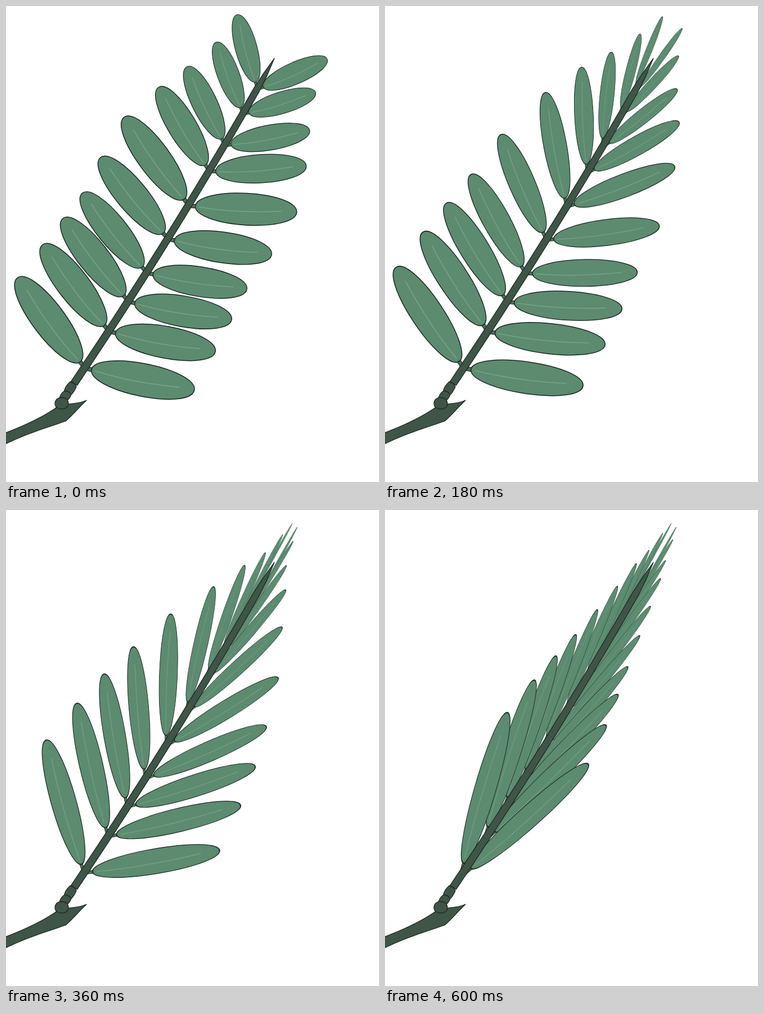
An HTML page that plays this animation: 663 px wide and 845 px high, repeating every 660 ms.

```html
<!DOCTYPE html>
<html lang="en">
<head>
<meta charset="utf-8">
<title>Folding leaf</title>
<style>
  html, body { margin: 0; width: 100%; height: 100%; overflow: hidden; background: #fff; }
  svg { display: block; width: 663px; height: 845px; }
  .wood { fill: #3f5547; stroke: #1c2a22; stroke-width: 1.3; stroke-linejoin: round; }
  .blade { fill: #5c8b70; stroke: #1b2720; stroke-width: 1.6; }
  .neck { fill: #4c705c; stroke: #1b2720; stroke-width: 1.2; }
  .vein { fill: none; stroke: #76a086; stroke-width: 1.9; stroke-linecap: round; }
</style>
</head>
<body>
<svg viewBox="0 0 663 845">
  <defs>
    <g id="leaf">
      <path class="neck" d="M-2-3 L13-4 V4 L-2 3Z"/>
      <path class="blade" d="M8 0C8-17 51-30 105-30C158-30 200-18 200 0C200 18 158 30 105 30C51 30 8 17 8 0Z"/>
      <path class="vein" d="M15 1Q88 9 171 0"/>
    </g>
  </defs>
  <g id="leaves"></g>
  <path class="wood" id="stem"/>
  <g class="wood">
    <path d="M-4 759C30 746 66 730 92 711C104 704 122 709 143 700C130 712 119 726 106 737C70 749 34 760 -4 779Z"/>
    <path d="M104 685Q103 677 114 667Q123 669 125 676Q121 685 117 689Q110 690 104 685Z"/>
    <path d="M95 697Q96 689 104 683Q113 684 116 690Q113 697 109 700Q101 701 95 697Z"/>
    <path d="M90 698Q99 692 108 698Q114 706 108 713Q99 718 90 713Q84 706 90 698Z"/>
  </g>
</svg>
<script>
const STEP = 60, STEPS = 11;
const LEFT = -1, RIGHT = 1;
const nodeY = [641, 576, 523, 472, 412, 352, 291, 244, 188, 143];

const lerp = (a, b, k) => a + (b - a) * k;
const clamp = v => Math.min(1, Math.max(0, v));

// The stem bows slightly to the right of a straight line.
function stemX(y) {
  const u = (670 - y) / 577;
  return 121 + 356 * u + 32 * u * (1 - u);
}

function drawStem() {
  const left = [], right = [];
  for (let i = 0; i <= 20; i++) {
    const y = lerp(670, 93, i / 20), x = stemX(y);
    const half = Math.min(lerp(6.5, 5.7, i / 18), (y - 93) * 0.13);
    left.push([x - half * 0.85, y - half * 0.53]);
    right.unshift([x + half * 0.85, y + half * 0.53]);
  }
  document.getElementById("stem").setAttribute("d", "M" + left.concat(right).join("L") + "Z");
}

// Pairs fold from the tip downwards: upper rows start fast, lower rows start late.
function pairPose(row, t) {
  const x = clamp(t / (10 - 0.45 * row));
  const delay = Math.max(1, 3 - 0.4 * row);
  const settle = 1.1 + 0.06 * (row - 4) ** 2;
  const spread = (1 - x ** delay) ** settle;

  const openAngle = 69 - 6 * Math.max(0, row - 4.3);
  const shutAngle = 16 - 1.75 * row;
  const openLength = Math.min(176 + 6 * Math.abs(row - 3), Math.max(129, 288 - 20 * row));
  const shutLength = 290 - 4 * row - 1.5 * row ** 2;
  const thin = Math.min(18, 30 - 2.9 * row);
  // The lowest leaves widen again as they settle against the stem.
  const swell = 5 * Math.max(0, 4 - row) * clamp((x - 0.8) / 0.2);

  return {
    axis: 57.7 + row * (0.35 + 0.4 * spread),
    half: lerp(shutAngle, openAngle, spread),
    length: lerp(openLength, shutLength, x ** 1.5),
    width: lerp(thin, 0.3 * openLength, spread ** 0.85) + swell
  };
}

function placeLeaf({ node, row, side }, { axis, half, length, width }) {
  const x = stemX(nodeY[row]) + 4 * side, y = nodeY[row] + 3 * side;
  node.setAttribute("transform",
    `translate(${x} ${y}) rotate(${side * half - axis}) scale(${length / 200} ${side * width / 60})`);
}

// Lower leaves overlap the ones above.
const leaves = [];
const holder = document.getElementById("leaves");
for (let row = nodeY.length - 1; row >= 0; row--) {
  for (const side of [LEFT, RIGHT]) {
    const node = document.createElementNS("http://www.w3.org/2000/svg", "use");
    node.setAttribute("href", "#leaf");
    holder.append(node);
    leaves.push({ node, row, side });
  }
}

let shown = -1;
function tick() {
  const step = Math.floor(performance.now() / STEP) % STEPS;
  if (step !== shown) {
    shown = step;
    for (const leaf of leaves) placeLeaf(leaf, pairPose(leaf.row, step));
  }
  requestAnimationFrame(tick);
}

drawStem();
tick();
</script>
</body>
</html>
```
